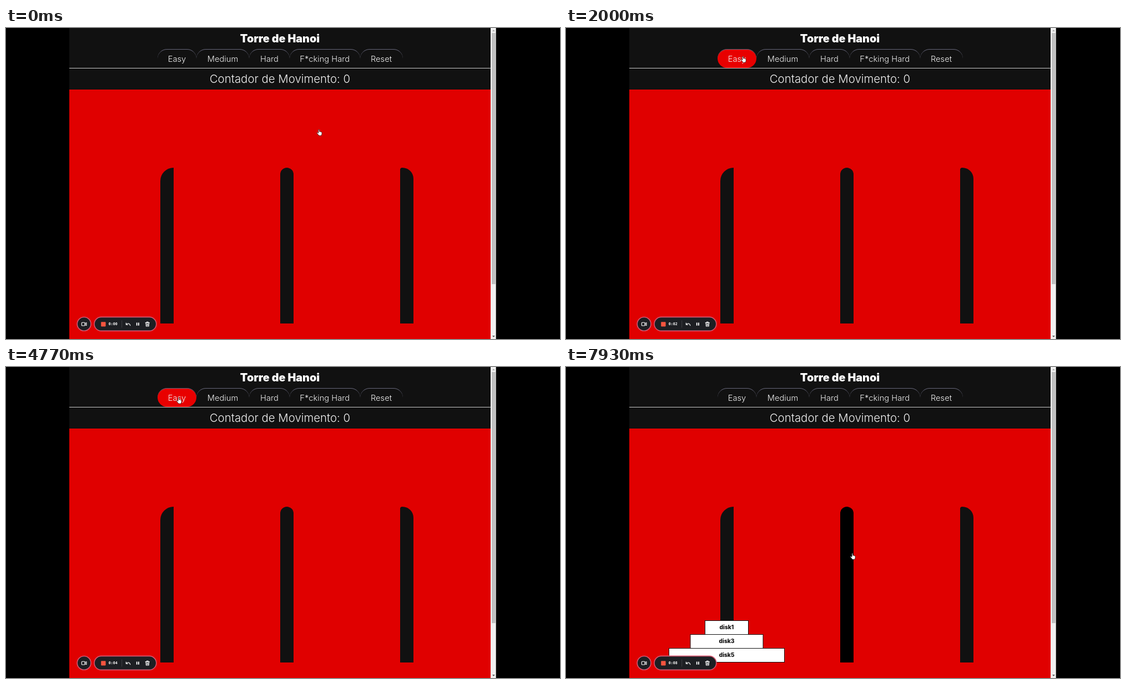
Animation of 998 by 561 pixels, one loop 8000 ms. Source, as an HTML page:

```html
<!DOCTYPE html>
<html lang="pt">
<head>
<meta charset="utf-8">
<title>Torre de Hanoi</title>
<style>
html, body { margin: 0; width: 100%; height: 100%; overflow: hidden; background: #000; }
#stage { position: relative; width: 998px; height: 561px; overflow: hidden; }
#stage > * { position: absolute; }
.page { left: 114px; top: 0; width: 759px; height: 561px; background: #e00000; }
.head { left: 114px; top: 0; width: 759px; height: 111px; background: #111; }
.rule { left: 114px; top: 72px; width: 759px; height: 1px; background: #c8c8c8; }
.tab { top: 38px; height: 34px; box-sizing: border-box; border-top: 1px solid #666679; border-radius: 17px; }
.tab.on { background: #e80000; }
.rod { top: 252px; width: 24px; height: 281px; background: #111; }
.rod.on { background: #000; }
svg { left: 0; top: 0; font-family: Inter, "Open Sans", sans-serif; text-anchor: middle; }
.title { font-size: 19.8px; font-weight: 900; fill: #fff; }
.label { font-size: 14.7px; font-weight: 300; fill: #f2f2f2; }
.count { font-size: 20.4px; font-weight: 300; fill: #f2f2f2; }
.disk rect { fill: #fff; stroke: #111; }
.disk.on rect { fill: #cf8521; }
.disk text { font-size: 10.2px; font-weight: 800; fill: #111; }
.icon { fill: none; stroke: #fff; stroke-width: 1.1; stroke-linecap: round; stroke-linejoin: round; }
#clock { font: bold 6.7px "DejaVu Sans Mono", monospace; fill: #fff; }
.cursor { stroke-linejoin: round; }
</style>
</head>
<body>
<div id="stage">
  <div class="page"></div>
  <div class="head"></div>
  <div class="rule"></div>
  <svg id="art" width="998" height="561" viewBox="0 0 998 561">
    <text class="title" x="493.5" y="25.7">Torre de Hanoi</text>
    <g id="labels"></g>
    <text class="count" x="493.5" y="99.3">Contador de Movimento: 0</text>

    <g id="scroll">
      <path fill="#f1f1f1" d="M873 0h9.7v561h-9.7z"/>
      <path fill="#c1c1c1" d="M875 9h6.8v453h-6.8z"/>
      <path fill="#a3a3a3" d="M876 6l2.4-2.8 2.4 2.8z"/>
      <path fill="#505050" d="M876 555l2.4 2.8 2.4-2.8z"/>
    </g>

    <g id="disks"></g>

    <g id="recorder">
      <g fill="#1d1f23" stroke="#d4566f" stroke-width="1.6">
        <circle cx="140.6" cy="533.9" r="12.4"/>
        <rect x="159" y="521.4" width="111.8" height="25" rx="12.5"/>
      </g>
      <rect x="171.2" y="530.2" width="8.4" height="8.2" rx=".8" fill="#f4553f"/>
      <path d="M208.7 527.5v13" stroke="#404247"/>
      <g class="icon">
        <rect x="136.3" y="531.2" width="5.8" height="5.8" rx="1"/>
        <path d="M142.3 533.2l2.6-1.6v5l-2.6-1.6"/>
        <path d="M216.3 532v3.3h3.3M216.6 535c2-3 6-2.8 7.3 1.8"/>
        <path d="M235.7 531.4v5.4M239 531.4v5.4" stroke-width="1.8" stroke-linecap="butt"/>
        <path d="M251.2 531.6h7.2M253.4 531.4v-1.2h2.8v1.2M252 532l.5 6h4.6l.5-6M254 533.6v2.8M255.7 533.6v2.8"/>
      </g>
      <text id="clock" x="192.8" y="536.2">0:00</text>
    </g>

    <path id="arrow" class="cursor" fill="#000" stroke="#fff" stroke-width=".8"
      d="M0 0v9.6l2.2-2 1.5 3.5 1.6-.7-1.5-3.4h3z"/>
    <path id="hand" class="cursor" fill="#fff" stroke="#000" stroke-width=".6"
      d="M-1 .8c0-1 1.7-1 1.7 0v3.2c.5-.5 1.4-.4 1.6.3 .6-.4 1.3-.2 1.5.5 .7-.2 1.3.1 1.3.9v2.3c0 1.2-.8 1.7-.8 3.1h-4.6c-.3-1.5-2.2-2.5-3.3-4.5-.5-1 .7-1.6 1.5-.8l1.1 1z"/>
  </svg>
</div>
<script>
const LOOP = 8000, DISKS_AT = 5230;
const stage = document.getElementById('stage');
const byId = id => document.getElementById(id);
const art = byId('art'), clock = byId('clock'), disksGroup = byId('disks');
const targets = [];

function addTarget(el, x, y, w, h, isDisk) {
  targets.push({ el, x, y, w, h, isDisk });
}

function addBox(cls, x, w) {
  const el = document.createElement('div');
  el.className = cls;
  el.style.left = x + 'px';
  el.style.width = w + 'px';
  stage.insertBefore(el, art);
  return el;
}

function addSvg(parent, tag, attrs, text = '') {
  const el = document.createElementNS('http://www.w3.org/2000/svg', tag);
  for (const k in attrs) el.setAttribute(k, attrs[k]);
  el.textContent = text;
  return parent.appendChild(el);
}

[['Easy', 273, 343], ['Medium', 343, 438], ['Hard', 438, 511],
 ['F*cking Hard', 511, 637.5], ['Reset', 637.5, 714.5]].forEach(([name, a, b]) => {
  addTarget(addBox('tab', a, b - a), a, 38, b - a, 34);
  addSvg(byId('labels'), 'text', { class: 'label', x: (a + b) / 2, y: 61 }, name);
});

[[278, '24px 0 0 0'], [494, '12px 12px 0 0'], [710, '4px 20px 0 0']].forEach(([x, radius]) => {
  const rod = addBox('rod', x, 24);
  rod.style.borderRadius = radius;
  addTarget(rod, x, 252, 24, 281);
});

[[1, 78], [3, 131], [5, 208]].forEach(([n, w], i) => {
  const x = 289.5 - w / 2, y = 457.5 + i * 25;
  const g = addSvg(disksGroup, 'g', { class: 'disk' });
  addSvg(g, 'rect', { x, y, width: w, height: 25 });
  addSvg(g, 'text', { x: 289.5, y: y + 15.5 }, 'disk' + n);
  addTarget(g, x, y, w, 25, true);
});

// pointer path: time, x, y
const path = [
  [0, 564, 183], [100, 548, 182], [530, 280, 171], [800, 264, 140], [1250, 296, 62],
  [1700, 306, 53], [2000, 319, 51], [2450, 392, 53], [2800, 474, 53], [3230, 579, 51],
  [3500, 596, 53], [4000, 474, 56], [4500, 320, 55], [4770, 311, 55], [5230, 311, 55],
  [5600, 330, 230], [6040, 292, 413], [6250, 293, 515], [6400, 294, 494], [6530, 295, 478],
  [6800, 293, 472], [7470, 293, 472], [7830, 506, 348], [7930, 516, 336], [8000, 516, 336]
];

function pointerAt(t) {
  const i = path.findIndex((p, k) => k > 0 && t <= p[0]);
  const [t0, x0, y0] = path[i - 1], [t1, x1, y1] = path[i];
  const u = (t - t0) / (t1 - t0), e = u * u * (3 - 2 * u);
  const k = (u + e) / 2;
  return [x0 + (x1 - x0) * k, y0 + (y1 - y0) * k];
}

function draw(t) {
  const [x, y] = pointerAt(t);
  const ready = t >= DISKS_AT;
  disksGroup.style.display = ready ? '' : 'none';

  const inside = b => (ready || !b.isDisk) && x >= b.x && x < b.x + b.w && y >= b.y && y < b.y + b.h;
  const hits = targets.filter(inside);
  const onDisk = hits.some(b => b.isDisk);
  targets.forEach(b => b.el.classList.toggle('on', hits.includes(b)));
  // the first rod holds the disks, so it lights up with them
  if (onDisk) stage.querySelector('.rod').classList.add('on');

  const pointing = hits.length > 0 || t < 90;
  byId('hand').style.display = pointing ? '' : 'none';
  byId('arrow').style.display = pointing ? 'none' : '';
  const move = `translate(${x.toFixed(1)} ${y.toFixed(1)})`;
  byId('hand').setAttribute('transform', move);
  byId('arrow').setAttribute('transform', move);

  clock.textContent = '0:0' + Math.floor((t + 200) / 1000);
}

const start = performance.now();
function tick() {
  draw((performance.now() - start) % LOOP);
  requestAnimationFrame(tick);
}
tick();
</script>
</body>
</html>
```
